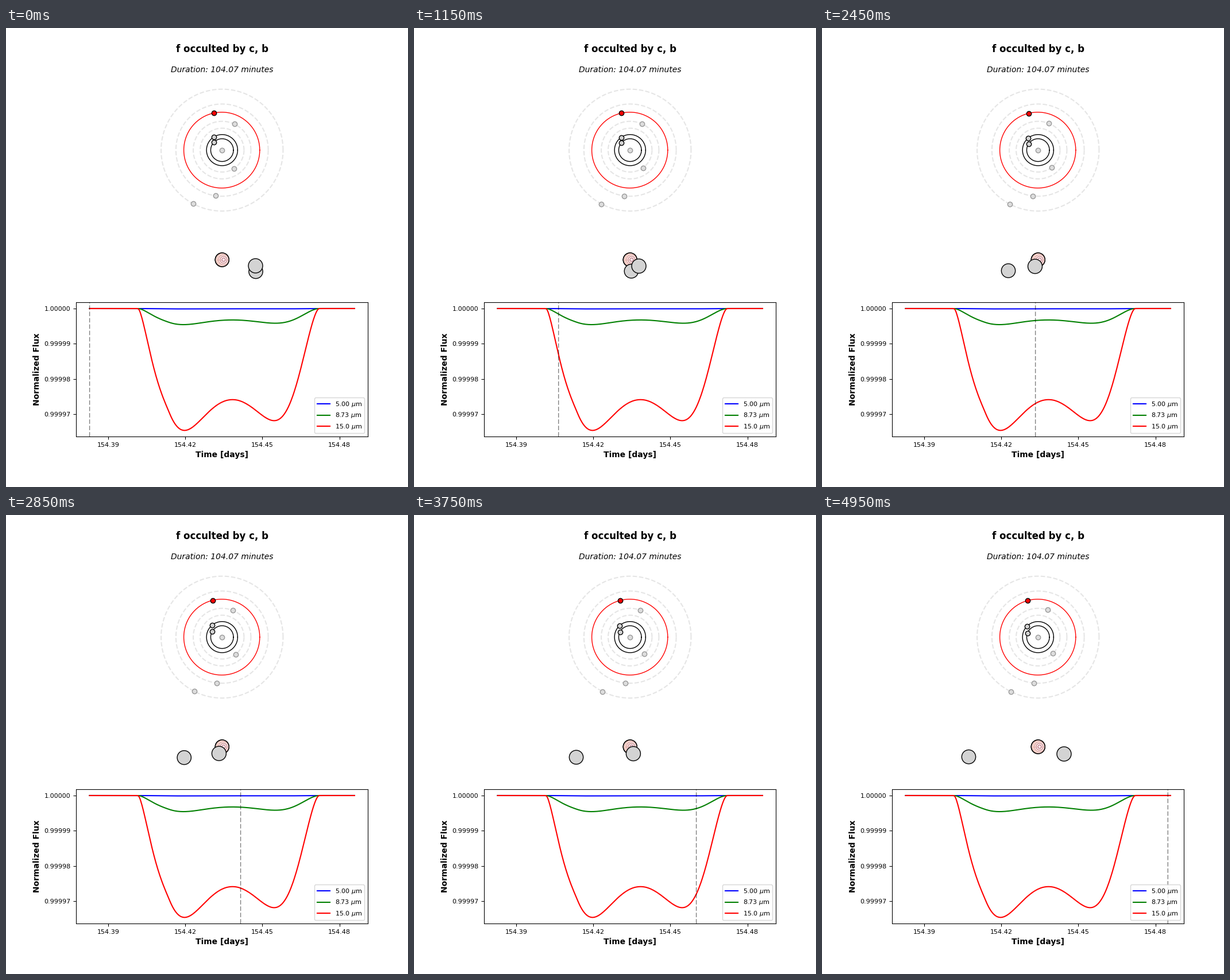
Animation, 700 px wide and 800 px high, one loop 5000 ms. Source, as a matplotlib script:

```python
import numpy as np
import matplotlib.pyplot as plt
from matplotlib.animation import FuncAnimation
from matplotlib.patches import Circle

FRAMES, STEP_MS = 100, 50
W, H, DPI = 700, 800, 100

# Light curve: start and length in days, depth of the deepest dip
T0, SPAN = 154.38275, 0.10312
DEPTH = 3.467e-5

# Orbits seen from above: semi-major axis (1e-3 AU) and start angle (degrees)
CENTER, AU_SCALE = (376.25, 212.83), 1.782
PLANETS = {
    "b": (11.11, 135.2),
    "c": (15.21, 121.2),
    "d": (21.44, -56.4),
    "e": (28.17, 64.6),
    "f": (37.10, 101.8),
    "g": (45.10, -98.1),
    "h": (59.60, -118.4),
}
OCCULTED, OCCULTORS = "f", ("c", "b")
ECCENTRIC_SHIFT = -0.55  # the occulted planet's orbit is slightly off centre

# Discs on the sky: the hot spot sits right of the occulted disc's middle
TARGET, HOT_SPOT = (376.25, 404), 2.7
RADII = {"f": 12.0, "c": 12.15, "b": 12.5}


def orbit_xy(name, angle):
    r = PLANETS[name][0] * AU_SCALE
    shift = ECCENTRIC_SHIFT if name == OCCULTED else 0
    return CENTER[0] + shift + r * np.cos(angle), CENTER[1] - r * np.sin(angle)


def planet_xy(name, days):
    axis, start = PLANETS[name]
    period = 0.0408 * axis ** 1.5  # Kepler's third law
    return orbit_xy(name, np.radians(start + 360 * days / period))


def sky_xy(name, n):
    """Place of an occulting disc after n frames."""
    if name == "c":
        return 435 - 2.63 * n + 0.00706 * n**2 + 1.2e-5 * n**3, 424.5 - 0.03 * n
    return 434.5 - 2.3545 * n + 0.02077 * n**2 + 1.7e-5 * n**3, 414.5 + 0.02 * n


def lost_light(steps, wave):
    """Light hidden by the occultors, scaled so that the deepest dip is 1."""
    r = RADII[OCCULTED]
    axis = np.linspace(-r, r, 101)
    x, y = np.meshgrid(axis, axis)
    inside = x**2 + y**2 < r**2
    x, y = x[inside], y[inside]
    z = np.sqrt(r**2 - x**2 - y**2)
    tilt = HOT_SPOT / r
    noon = np.clip((x * tilt + z * np.sqrt(1 - tilt**2)) / r, 0, 1)
    glow = noon ** (12.4 / wave)  # shorter waves favour the hot spot

    lost = []
    for n in steps:
        seen = np.ones_like(x)
        for name in OCCULTORS:
            cx, cy = sky_xy(name, n)
            gap = np.hypot(x + TARGET[0] - cx, y + TARGET[1] - cy) - RADII[name]
            seen = np.minimum(seen, np.clip(gap / 0.24 + 0.5, 0, 1))
        lost.append(np.sum(glow * (1 - seen)))
    return np.array(lost) / max(lost)


fig = plt.figure(figsize=(W / DPI, H / DPI), dpi=DPI, facecolor="white")
fig.subplots_adjust(left=0.175)

# Light curve
ax = plt.subplot2grid((5, 3), (3, 0), colspan=3, rowspan=2)
ax.set_xlim(T0 - 0.05 * SPAN, T0 + 1.05 * SPAN)
ax.set_ylim(1 - 1.05 * DEPTH, 1 + 0.05 * DEPTH)

steps = np.linspace(0, FRAMES, 401)
times = T0 + SPAN * steps / FRAMES
for wave, color, share in [("5.00", "blue", 0.003), ("8.73", "green", 0.132),
                           ("15.0", "red", 1)]:
    flux = 1 - DEPTH * share * lost_light(steps, float(wave))
    ax.plot(times, flux, color=color, label=r"%s $\mu$m" % wave)
now = ax.axvline(T0, color="k", alpha=0.5, lw=1, ls=(0, (5.55, 2.4)), snap=False)

x_ticks = 154.39 + 0.03 * np.arange(4)
y_ticks = 0.99997 + 1e-5 * np.arange(4)
ax.set_xticks(x_ticks, ["%.2f" % v for v in x_ticks], fontsize=8)
ax.set_yticks(y_ticks, ["%.5f" % v for v in y_ticks], fontsize=8)
ax.set_xlabel("Time [days]", fontsize=10, fontweight="bold")
ax.set_ylabel("Normalized Flux", fontsize=10, fontweight="bold")
ax.legend(loc="lower right", fontsize=8)

# Pixel canvas for the titles, orbits and discs
sky = fig.add_axes([0, 0, 1, 1])
sky.set(xlim=(0, W), ylim=(H, 0))
sky.axis("off")
sky.text(CENTER[0], 42, "f occulted by c, b", ha="center", fontsize=12,
         fontweight="bold")
sky.text(CENTER[0], 77, "Duration: 104.07 minutes", ha="center", fontsize=10,
         style="italic")


def add_marker(x, y, face="#dddddd", edge="#999999"):
    return sky.plot([x], [y], "o", ms=6, mfc=face, mec=edge, mew=1, zorder=9)[0]


turn = np.linspace(0, 2 * np.pi, 1000)
markers = {}
add_marker(*CENTER)
for name in PLANETS:
    if name == OCCULTED:
        line, dot = dict(color="r", lw=1), ("r", "k")
    elif name in OCCULTORS:
        line, dot = dict(color="k", lw=1), ("lightgrey", "k")
    else:
        line, dot = dict(color="k", alpha=0.1, ls="--"), ()
    sky.plot(*orbit_xy(name, turn), **line)
    markers[name] = add_marker(*planet_xy(name, 0), *dot)


def add_disc(name, center, face, zorder):
    return sky.add_patch(Circle(center, RADII[name], fc=face, ec="k", lw=1,
                                zorder=zorder))


# Occulted planet with rings of rising temperature around the hot spot
body = add_disc(OCCULTED, TARGET, "#f7e3df", 10)
for k in range(4):
    ring = sky.add_patch(Circle((TARGET[0] + HOT_SPOT, TARGET[1]), 12 - 3 * k,
                                fc=(0.97, 0.88 + 0.03 * k, 0.86 + 0.035 * k),
                                ec=(0.91 - 0.07 * k, 0.66 - 0.11 * k, 0.6 - 0.06 * k),
                                lw=0.7, zorder=11))
    ring.set_clip_path(body)
sky.plot([TARGET[0] - 11, TARGET[0] + 11], [TARGET[1]] * 2, color="#c0504d",
         alpha=0.5, lw=0.7, ls=":", zorder=12)
add_disc(OCCULTED, TARGET, "none", 13)

discs = {name: add_disc(name, sky_xy(name, 0), "lightgrey", 14 + i)
         for i, name in enumerate(OCCULTORS)}


def draw(n):
    days = SPAN * n / FRAMES
    now.set_xdata([T0 + days] * 2)
    for name, marker in markers.items():
        x, y = planet_xy(name, days)
        marker.set_data([x], [y])
    for name, disc in discs.items():
        disc.center = sky_xy(name, n)
    return []


anim = FuncAnimation(fig, draw, frames=FRAMES, interval=STEP_MS, repeat=True,
                     repeat_delay=0)
plt.show()
```
